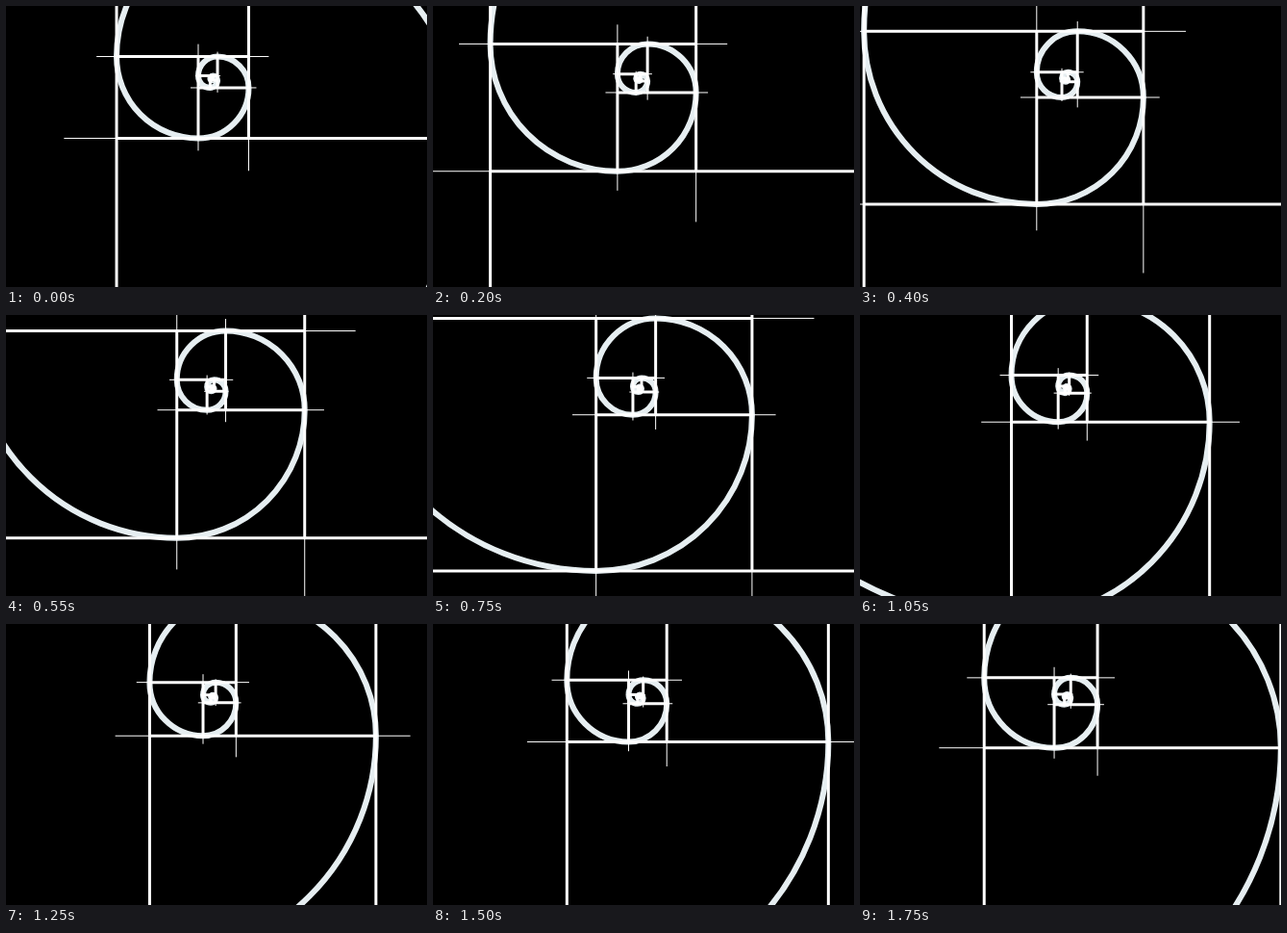
Write an HTML page with a canvas that moves like this. It is 438 by 292 pixels and loops after 1800 ms.

```html
<!DOCTYPE html>
<html lang="en">
<head>
<meta charset="utf-8">
<title>Golden spiral zoom</title>
<style>
  html, body { margin: 0; width: 100%; height: 100%; overflow: hidden; background: #000; }
  canvas { display: block; width: 438px; height: 292px; }
</style>
</head>
<body>
<canvas id="stage" width="438" height="292"></canvas>
<script>
const ctx = document.getElementById('stage').getContext('2d');
const PHI = (1 + Math.sqrt(5)) / 2;
const POLE = { x: 214.5, y: 76 };

// Arc centre relative to the pole, for a square of side 1
const CX = -(3 * Math.sqrt(5) - 5) / 10;
const CY = -(5 - Math.sqrt(5)) / 10;

const OUTER = -5, INNER = 12;
const START = 84.95;           // side of the level 0 square at time 0
const GROWTH = PHI ** 4 - 1;   // four quarter turns of zoom per cycle
const CYCLE = 2100, LOOP = 1800, STEP = 50;
const OVERHANG = 0.152;

// Visit each square, turned a quarter and shrunk by PHI per level
function eachLevel(side, visit) {
  for (let k = OUTER; k <= INNER; k++) {
    ctx.save();
    ctx.translate(POLE.x, POLE.y);
    ctx.rotate(-k * Math.PI / 2);
    visit(side / PHI ** k);
    ctx.restore();
  }
}

function strokeLevels(side, width, color, trace) {
  ctx.beginPath();
  eachLevel(side, trace);
  ctx.lineWidth = width;
  ctx.strokeStyle = color;
  ctx.stroke();
}

function divider(overhang) {
  return s => {
    ctx.moveTo(CX * s, (CY - overhang) * s);
    ctx.lineTo(CX * s, (CY + 1 + overhang) * s);
  };
}

function draw(time) {
  const side = START * (1 + GROWTH * time / CYCLE);
  ctx.fillStyle = '#000';
  ctx.fillRect(0, 0, 438, 292);
  strokeLevels(side, 6, '#e6eef1', s => ctx.arc(CX * s, CY * s, s, Math.PI, Math.PI / 2, true));
  strokeLevels(side, 1, '#fff', divider(OVERHANG));
  strokeLevels(side, 3, '#fff', divider(0));
}

const begin = performance.now();
function tick() {
  const time = (performance.now() - begin) % LOOP;
  draw(Math.floor(time / STEP) * STEP);
  requestAnimationFrame(tick);
}
tick();
</script>
</body>
</html>
```
